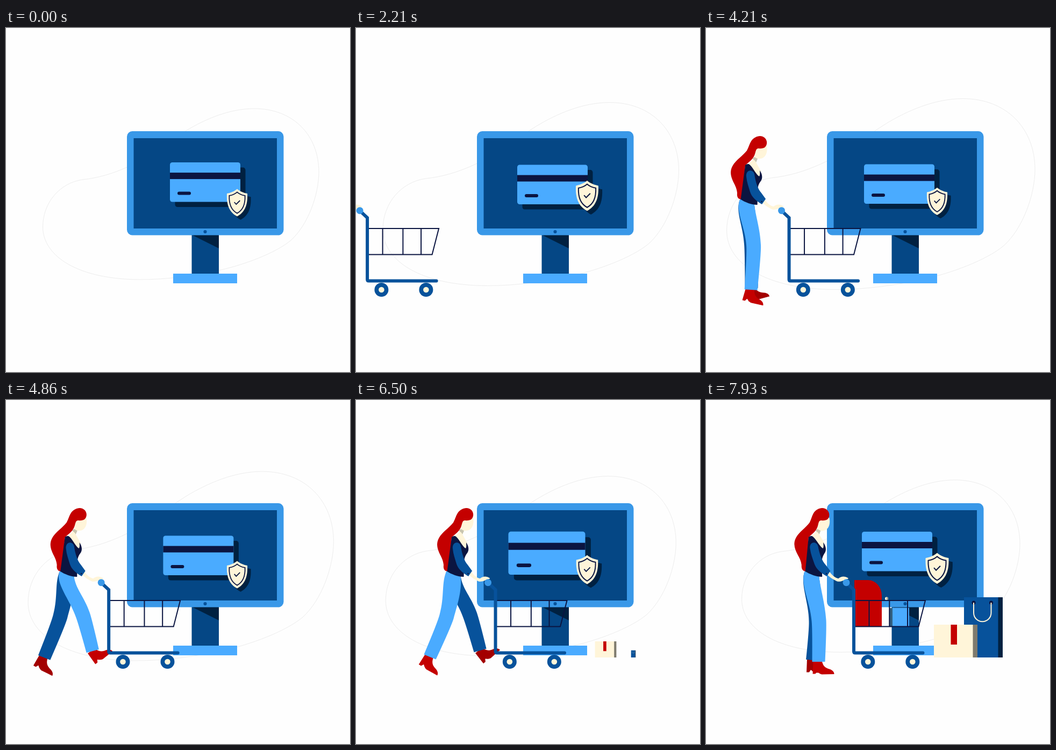
Recreate the animation shown at these times as an HTML page. Size 640 px wide and 640 px high, loop 8 s.

```html
<!DOCTYPE html>
<html lang="en">
<head>
<meta charset="utf-8">
<title>Online checkout</title>
<style>
  html, body { margin: 0; width: 100%; height: 100%; overflow: hidden; background: #fefefe; }
  svg { display: block; width: 100%; height: 100%; }
  .sky { fill: #4aabff; }
  .azure { fill: #3998e8; }
  .blue { fill: #07529b; }
  .screen { fill: #054785; }
  .shade { fill: #002141; }
  .navy { fill: #0b1541; }
  .cream { fill: #fff5d9; }
  .red { fill: #c40000; }
  .maroon { fill: #a30000; }
  .line { fill: none; stroke: #0b1541; stroke-width: 2; }
</style>
</head>
<body>
<svg viewBox="0 0 640 640">
  <defs>
    <path id="shieldShape" d="M0-25.5C5-21 13-18 19-17C20 5 14 18 0 25.5C-14 18-20 5-19-17C-13-18-5-21 0-25.5Z"/>
    <path id="boot" d="M-10-2L6-2C8 6 10 10 18 13C26 15 29 19 29 23L6 23.5C0 22-2 18-3 18L-6 22.5L-11 22.5Z"/>
    <g id="wheel"><circle r="13" class="blue"/><circle r="5.3" class="cream"/></g>
  </defs>

  <path id="blob" fill="none" stroke="#ededed" vector-effect="non-scaling-stroke"
    d="M143 282C100 288 68.5 325 68.5 370C68.5 425 135 468 250 468C300 468 350 461 400 450C440 441 500 420 530 395C562 366 582 310 582 268C582 200 535 150 462 150C415 150 370 170 335 191C295 216 262 243 225 259C198 271 172 279 143 282Z"/>

  <g id="monitor">
    <rect x="345.5" y="384" width="50.5" height="74" class="screen"/>
    <path d="M346 385H396V410Z" class="shade"/>
    <rect x="311" y="457" width="119" height="18" class="sky"/>
    <rect x="225" y="192" width="291.5" height="193.5" rx="10" class="azure"/>
    <rect x="237.5" y="205" width="266.5" height="168" class="screen"/>
    <circle cx="370.5" cy="379" r="3.1" class="blue"/>
  </g>

  <g id="card">
    <rect x="-56" y="-27.2" width="131" height="73.5" rx="4.5" class="shade"/>
    <rect x="-65.5" y="-36.8" width="131" height="73.5" rx="4.5" class="sky"/>
    <rect x="-65.5" y="-17.7" width="131" height="12" class="navy"/>
    <rect x="-51.5" y="17.7" width="25" height="6" rx="3" class="navy"/>
  </g>

  <g id="shield">
    <use href="#shieldShape" x="6.5" y="6.3" class="shade"/>
    <use href="#shieldShape" class="cream"/>
    <use href="#shieldShape" class="line" transform="scale(.77)" style="stroke-width:2.4"/>
    <path d="M-5.3-1L-1.7 3L5.3-4" class="line" style="stroke-width:1.8"/>
  </g>

  <g id="bag">
    <rect x="-36" y="-112" width="64" height="112" class="blue"/>
    <rect x="27.5" y="-112" width="8.5" height="112" class="shade"/>
    <circle cx="-18" cy="-102" r="3.5" class="navy"/>
    <circle cx="14.5" cy="-102" r="3.5" class="navy"/>
    <path d="M-18-102V-83A16.2 16.2 0 0 0 14.5-83V-102" fill="none" stroke="#fff5d9" stroke-width="2"/>
  </g>
  <g id="box">
    <rect x="-40.5" y="-61" width="73" height="61" class="cream"/>
    <rect x="32" y="-61" width="8.5" height="61" fill="#7f7b6d"/>
    <rect x="-9" y="-61" width="11.5" height="37" class="red"/>
  </g>

  <g id="walker">
    <use href="#boot" id="farBoot" class="maroon"/>
    <path id="farLeg" class="blue"/>
    <use href="#boot" id="nearBoot" class="red"/>
    <path id="nearLeg" class="sky"/>
    <g id="torso">
      <path class="cream" d="M92 222L113 219C115 231 111 242 101 243C98 244 96 243 95 243L93 250L102 266L100 277L93 273L77 254L86 247L91 238Z"/>
      <path fill="#c9c5b0" d="M90 240L96 243.3L93 250C91 246 88 244 86 243Z"/>
      <path class="red" d="M100 201C109 201 114 208 113 215C112 222 107 225 98 224C92 224 93 230 90 237C86 246 78 250 73 256L67 319C60 319 57 315 58 307C57 292 46 284 46 268C47 250 65 242 76 228C82 218 82 203 100 201Z"/>
      <path class="navy" d="M73 255C76 253 79 252 82 255C89 262 94 274 99 276C101 273 100 268 100 265C105 272 106 280 101 286C96 293 95 302 96 312L95.500 329C85 329 72 324 64.500 319Z"/>
      <path class="cream" d="M109 319C115 327 121 332 126 332C130 328 138 327 144 331.500C144 334 140 333 137 335C132 337 127 339 122 337C116 334 110 330 106 326Z"/>
      <path class="blue" d="M75 277C73 264 87 261 90 272C92 286 96 299 103 307L111 318L104 328C94 322 85 315 82 305C79 295 76 287 75 277Z"/>
      <circle cx="103.500" cy="323" r="1.200" class="navy"/>
    </g>
  </g>

  <g id="cart">
    <g id="redItem"><path class="red" d="M-25.500 0V-86H0A25.500 29 0 0 1 25.500-57V0Z"/></g>
    <g id="blueItem">
      <rect x="-18" y="-34" width="5.500" height="34" fill="#315f80"/>
      <rect x="-13" y="-34.500" width="31" height="34.500" class="sky"/>
    </g>
    <g id="bead"><circle r="3" class="cream"/><path d="M0-3A3 3 0 0 1 0 3Z" fill="#a8a595"/></g>
    <path d="M0 373H133L120.500 421.500H0M28.500 373V422.500M66.300 373V422.500M100 373V422.500" class="line"/>
    <path d="M-14 340L0 353V468Q0 470.500 2.500 470.500H128.500" fill="none" stroke="#07529b" stroke-width="6" stroke-linecap="round"/>
    <circle cx="-14" cy="339.700" r="6.500" class="azure"/>
    <use href="#wheel" x="26.300" y="487"/>
    <use href="#wheel" x="109.300" y="487"/>
  </g>
</svg>
<script>
const LOOP = 8000, STRIDE = 3070, FIRST_STEP = 3430;
const el = id => document.getElementById(id);
const move = (id, value) => el(id).setAttribute('transform', value);

// Smooth monotone interpolation through rows of [time, value, ...].
function track(rows) {
  const slope = (i, k) => (rows[i + 1][k] - rows[i][k]) / (rows[i + 1][0] - rows[i][0]);
  const tangent = (i, k) => {
    if (i === 0) return slope(0, k);
    if (i === rows.length - 1) return slope(i - 1, k);
    const a = slope(i - 1, k), b = slope(i, k);
    return a * b <= 0 ? 0 : 2 * a * b / (a + b);
  };
  return t => {
    const last = rows[rows.length - 1];
    if (t <= rows[0][0]) return rows[0].slice(1);
    if (t >= last[0]) return last.slice(1);
    const i = rows.findIndex(r => r[0] > t) - 1;
    const [p, q] = [rows[i], rows[i + 1]], d = q[0] - p[0], u = (t - p[0]) / d, v = 1 - u;
    return p.slice(1).map((a, j) => {
      const k = j + 1;
      return a * (1 + 2 * u) * v * v + q[k] * u * u * (3 - 2 * u)
        + d * u * v * (tangent(i, k) * v - tangent(i + 1, k) * u);
    });
  };
}

const clamp = x => Math.min(1, Math.max(0, x));
const ease = (t, from, to) => (1 - Math.cos(Math.PI * clamp((t - from) / (to - from)))) / 2;

const cartX = track([[0, -136], [1000, -63], [2210, 21], [3430, 104], [4210, 154.5],
  [5500, 222.5], [6500, 259.5], [7100, 271.5], [7750, 275]]);
const cardAt = track([[0, 370.5, 286.8], [1100, 368.3, 289.7], [2210, 365.5, 291.3], [2800, 363.6, 291.5],
  [3430, 361.5, 291.3], [4210, 359.5, 290.3], [5500, 356.5, 288], [6500, 355, 285], [7930, 355.5, 281.7]]);
const cardScale = track([[5700, 1], [6500, 1.092], [7300, 1]]);
const shieldScale = track([[650, 1], [1570, 1.063], [2210, 1.1], [2950, 1.13], [3400, 1]]);

// Leg poses: time, knee x y, ankle x y, boot angle.
const trailing = [-91, 403, -122, 478, 30], leading = [-47.5, 400, -28.5, 466, -40];
const nearPose = track([[3430, ...trailing], [4210, -66, 405, -71, 487, 14], [4965, ...leading],
  [5500, -80.5, 405, -88, 488, 8], [6500, ...trailing], [7350, -65, 410, -65.5, 487, 0]]);
const farPose = track([[3430, ...leading], [4210, -70, 402, -70, 484, -14], [4965, ...trailing],
  [5500, -64, 412, -90, 462, 32], [6500, ...leading], [7350, -70, 412, -77, 484, 0]]);

function drawLeg(name, [kx, ky, ax, ay, angle]) {
  const unit = (x, y) => { const n = Math.hypot(x, y); return [x / n, y / n]; };
  const thigh = unit(kx + 78, ky - 325), shin = unit(ax - kx, ay - ky);
  const bend = unit(thigh[0] + shin[0], thigh[1] + shin[1]);
  const at = (x, y, dir, side, along = 0) =>
    `${x + dir[1] * side + dir[0] * along} ${y - dir[0] * side + dir[1] * along}`;
  const knee = (side, along) => at(kx, ky, bend, side, along);
  const ankle = side => at(ax, ay, shin, side);
  el(name + 'Leg').setAttribute('d',
    `M-91 318C-101 340 ${knee(-13.5, -35)} ${knee(-13.5)}Q${knee(-13, 14)} ${ankle(-12)}` +
    `L${ankle(12)}Q${knee(13.5, 14)} ${knee(13.5)}C${knee(13.5, -32)} -62 352 -65 326Z`);
  move(name + 'Boot', `translate(${ax} ${ay}) rotate(${angle})`);
}

const pop = (id, x, y, scale) => move(id, `translate(${x} ${y}) scale(${scale})`);

function draw(t) {
  const swell = 1 + 0.118 * (t < 3850 ? ease(t, 100, 3800) : 1 - ease(t, 3900, 8730));
  move('blob', `translate(325 309) scale(${swell}) translate(-325 -309)`);

  const [cx, cy] = cardAt(t);
  pop('card', cx, cy, cardScale(t)[0]);
  const bob = 318.4 + 6.6 * Math.cos(2 * Math.PI * t / 4930);
  pop('shield', 430, bob, shieldScale(t % 4930)[0]);

  const x = cartX(t)[0];
  move('cart', `translate(${x})`);
  move('walker', `translate(${x})`);
  const stepTime = t < FIRST_STEP ? t + STRIDE : t;
  drawLeg('near', nearPose(stepTime));
  drawLeg('far', farPose(stepTime));
  move('torso', `translate(-154.5 325) skewX(${2.2 * ease(t, 6600, 7500)}) translate(0 -325)`);

  pop('box', 464.5, 479, ease(t, 6150, 6860));
  pop('bag', 516, 479, ease(t, 6340, 7060));
  pop('redItem', 26.5, 421, ease(t, 6750, 7400));
  pop('blueItem', 85, 421, ease(t, 7050, 7750));
  pop('bead', 61, 369.5, ease(t, 7600, 7930));
}

const start = performance.now();
function frame() {
  draw((performance.now() - start) % LOOP);
  requestAnimationFrame(frame);
}
frame();
</script>
</body>
</html>
```
